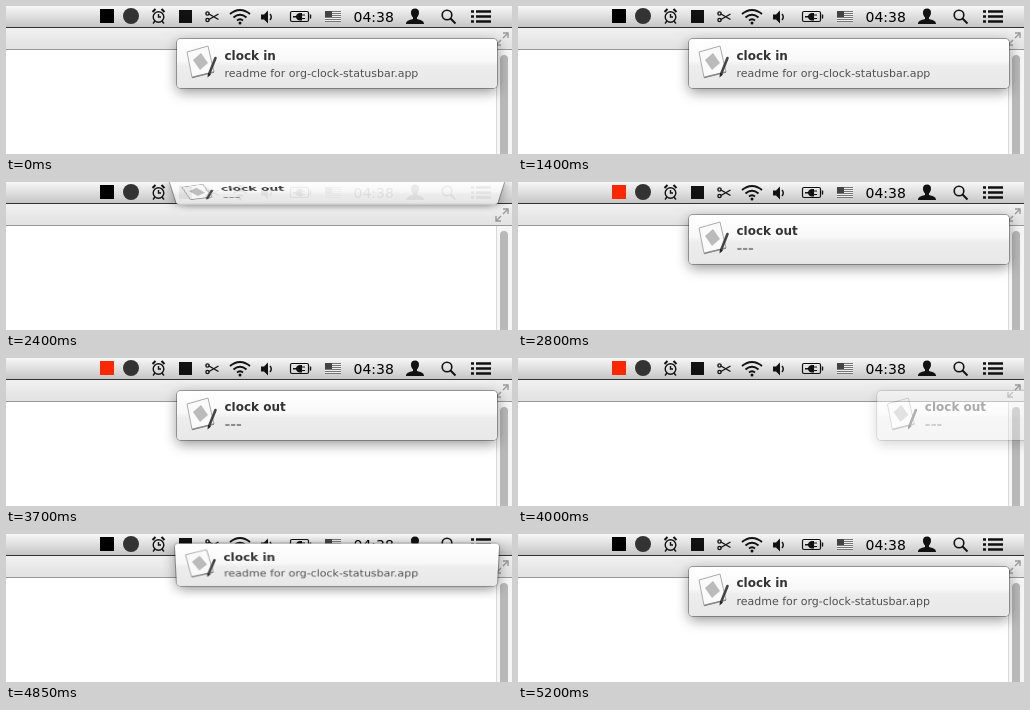
Recreate the animation shown at these times as an HTML page. Size 506 by 148 pixels, loop 5.35 s.

```html
<!DOCTYPE html>
<html lang="en">
<head>
<meta charset="utf-8">
<title>Clock notifications</title>
<style>
html, body { margin: 0; width: 100%; height: 100%; overflow: hidden; background: #fff; }
#stage { position: relative; width: 506px; height: 148px; overflow: hidden; }
svg { position: absolute; left: 0; top: 0; }
text { font-family: "DejaVu Sans", sans-serif; }
#card {
  position: absolute; left: 171px; top: 33px; width: 320px; height: 49px;
  border-radius: 4px; transform-origin: 50% 100%;
  background: linear-gradient(#fff, #f8f8f8 45%, #ededed 55%, #e8e8e8);
  box-shadow: 0 0 0 1px rgba(0,0,0,.3), 0 4px 13px rgba(0,0,0,.42);
}
.dashes { font-size: 14px; font-weight: bold; fill: #8c8c8c; }
</style>
</head>
<body>
<div id="stage">
  <svg width="506" height="148" fill="none" stroke="#111" stroke-width="1.4">
    <defs>
      <linearGradient id="menu" x2="0" y2="1"><stop stop-color="#f7f7f7"/><stop offset="1" stop-color="#c6c6c6"/></linearGradient>
      <linearGradient id="bar" x2="0" y2="1"><stop stop-color="#f0f0f0"/><stop offset="1" stop-color="#e2e2e2"/></linearGradient>
    </defs>

    <!-- window -->
    <g stroke="none">
      <path fill="#fff" d="M0 0h506v148H0z"/>
      <path fill="url(#bar)" d="M0 22h506v21H0z"/>
      <path fill="#999" d="M0 43h506v1H0z"/>
      <path fill="#f6f6f6" d="M490 44h16v104h-16z"/>
      <path fill="#d8d8d8" d="M490 44h1v104h-1z"/>
      <rect x="494" y="49" width="8" height="110" rx="4" fill="#b8b8b8"/>
    </g>
    <path stroke="#999" d="M490 39l5-5m2-2l5-5M497 27h5v5M490 34v5h5"/>

    <!-- menu bar -->
    <g stroke="none">
      <path fill="url(#menu)" d="M0 0h506v21H0z"/>
      <path fill="#333" d="M0 21h506v1H0z"/>
      <path id="status" d="M94 3h14v14H94z"/>
      <circle cx="125" cy="10" r="8" fill="#333"/>
      <path fill="#111" d="M173 4h13v13h-13z"/>
    </g>
    <!-- alarm clock -->
    <circle cx="152.5" cy="11" r="5.3"/>
    <path d="M152.5 8v3h2.5M149 15l-2 2.5M156 15l2 2.5"/>
    <path stroke-width="2" d="M146.500 6l3-3M158.500 6l-3-3"/>
    <!-- scissors -->
    <path d="M203 8l9.5 5.500M203 13.500l9.500-5.500"/>
    <circle cx="201.500" cy="7.500" r="1.600"/><circle cx="201.500" cy="14" r="1.600"/>
    <!-- wireless -->
    <path stroke-width="2" d="M224 8q10-8 20 0M227.500 11.500q6.500-5.500 13 0M231 14.500q3-2.500 6 0"/>
    <circle cx="234" cy="17" r="1.500" fill="#111" stroke="none"/>
    <!-- speaker -->
    <path fill="#111" stroke="none" d="M255 8.500h3l4-4v13l-4-4h-3z"/>
    <path d="M264 8q2.500 3 0 6"/>
    <!-- battery -->
    <rect x="284.500" y="5.500" width="18" height="10" rx="1.500" stroke-width="1.200"/>
    <path d="M304.500 8.500v4"/>
    <path fill="#111" stroke="none" d="M287 10h3q1-3 4-3h2v1.500h3v1h-3v2.500h3v1h-3v1.500h-2q-3 0-4-3h-3z"/>
    <!-- flag -->
    <path fill="#eee" stroke="none" d="M319 5h16v11h-16z"/>
    <path stroke="#777" stroke-width="1" d="M319 5.500h16m-16 2h16m-16 2h16m-16 2h16m-16 2h16m-16 2h16"/>
    <path fill="#444" stroke="none" d="M319 5h7v6h-7z"/>
    <text x="347.500" y="16" font-size="14" fill="#000" stroke="none">04:38</text>
    <!-- user -->
    <path fill="#111" stroke="none" d="M409 2.500c5 0 5 6 2 9v1.500c4 1 7 2 7 5h-18c0-3 3-4 7-5v-1.500c-3-3-3-9 2-9z"/>
    <!-- search -->
    <circle cx="441" cy="9" r="4.800" stroke-width="1.600"/><path stroke-width="2" d="M444.500 12.500l5 5"/>
    <!-- list -->
    <path stroke-width="2.500" d="M465 5.500h3m2 0h15M465 10.500h3m2 0h15M465 15.500h3m2 0h15"/>
  </svg>

  <div id="card">
    <svg width="320" height="49">
      <path d="M10 13L31 7 37 33 15 38.500z" fill="#fafafa" stroke="#aaa"/>
      <path d="M15 38.500L37 33" stroke="#888" stroke-width="1.500"/>
      <path d="M16 21l8-7 7 10-8 7z" fill="#bbb"/>
      <path d="M38.500 19L32.500 34" stroke="#444" stroke-width="2.600" stroke-linecap="round"/>
      <path d="M31 34l3 1.500-3.500 3z" fill="#222"/>
      <text id="title" x="47.500" y="20.500" font-size="12" font-weight="bold" fill="#333"></text>
      <text id="note" x="47.500" y="38" font-size="11" fill="#505050"></text>
    </svg>
  </div>
</div>
<script>
const LOOP = 5350, STEP = 50, SLIDE = 540, DROP = 650;
const [card, title, note, status] =
  ['card', 'title', 'note', 'status'].map(id => document.getElementById(id));

const ease = (t, start, length) => {
  const x = Math.min(1, Math.max(0, (t - start) / length));
  return (1 - Math.cos(Math.PI * x)) / 2;
};

function setMessage(clockedOut) {
  title.textContent = clockedOut ? 'clock out' : 'clock in';
  note.textContent = clockedOut ? '---' : 'readme for org-clock-statusbar.app';
  note.classList.toggle('dashes', clockedOut);
}

// The card swings down from the menu bar, flattening as it comes to rest,
// then leaves to the right while fading.
function placeCard(drop, slide) {
  const up = 1 - drop;
  const swing = up > 0 ? `perspective(${660 / up}px) rotateX(${-90 * up}deg)` : '';
  card.style.transform = `translate(${321 * slide}px, ${-86 * up}px) ${swing}`;
  card.style.opacity = Math.min(1, drop * 3) * (1 - slide);
}

function draw() {
  const t = Math.floor(performance.now() % LOOP / STEP) * STEP;
  setMessage(t >= 2100 && t < 4400);
  status.setAttribute('fill', t >= 2500 && t < 4800 ? '#ff2600' : '#000');
  if (t < 2100) placeCard(1, ease(t, 1400, SLIDE));
  else if (t < 4400) placeCard(ease(t, 2156, DROP), ease(t, 3700, SLIDE));
  else placeCard(ease(t, 4462, DROP), 0);
  requestAnimationFrame(draw);
}
draw();
</script>
</body>
</html>
```
